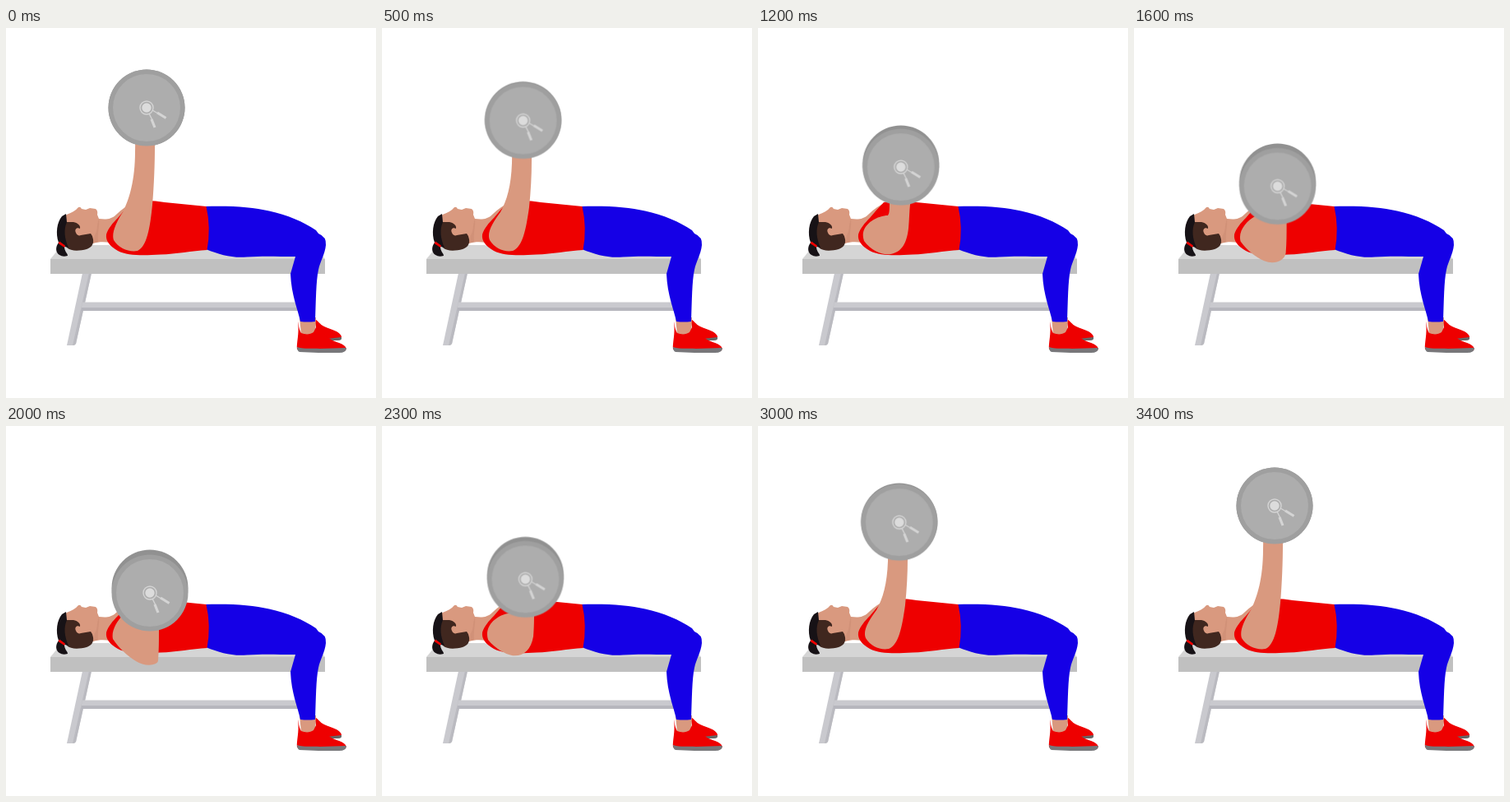
Recreate the animation shown at these times as an HTML page without scripts. Size 450 by 450 pixels, loop 3500 ms.

```html
<!DOCTYPE html>
<html lang="en">
<head>
<meta charset="utf-8">
<title>Bench press</title>
<style>
html, body { margin: 0; width: 100%; height: 100%; overflow: hidden; background: #fff; }
svg { display: block; width: 100vw; height: 100vh; }
.skin { fill: #d9997f; }
.red { fill: #ee0000; }
.blue { fill: #1500e6; }

/* --drop is the full travel; the far plate travels a little less */
.front { --drop: 106px; }
.back { --drop: 100px; }
.plate { animation: press 3.5s -10ms infinite; }
.arm { animation: bend 3.5s -10ms infinite; }

@keyframes press {
  0% { transform: translate(0, 0); animation-timing-function: steps(3); }
  8.5714% { transform: translate(.2px, calc(var(--drop) * .05)); animation-timing-function: steps(3); }
  17.1429% { transform: translate(.8px, calc(var(--drop) * .195)); animation-timing-function: steps(2); }
  22.8571% { transform: translate(1.4px, calc(var(--drop) * .35)); animation-timing-function: steps(4); }
  34.2857% { transform: translate(2.7px, calc(var(--drop) * .68)); animation-timing-function: steps(4); }
  45.7143% { transform: translate(3.6px, calc(var(--drop) * .9)); animation-timing-function: steps(2); }
  51.4286% { transform: translate(3.9px, calc(var(--drop) * .975)); animation-timing-function: steps(2); }
  57.1429% { transform: translate(4px, var(--drop)); animation-timing-function: steps(2); }
  62.8571% { transform: translate(3.7px, calc(var(--drop) * .91)); animation-timing-function: steps(2); }
  68.5714% { transform: translate(3.1px, calc(var(--drop) * .776)); animation-timing-function: steps(2); }
  74.2857% { transform: translate(2.3px, calc(var(--drop) * .58)); animation-timing-function: steps(4); }
  85.7143% { transform: translate(.8px, calc(var(--drop) * .19)); animation-timing-function: steps(2); }
  91.4286% { transform: translate(.2px, calc(var(--drop) * .06)); animation-timing-function: steps(2); }
  97.1429%, 100% { transform: translate(0, 0); }
}

@keyframes bend {
  0%, 97.1429%, 100% { d: path("M158 97L157 150C157 185 150 208 142 224C134 236 128 250 131 258C137 268 150 273 160 271C171 266 175 245 178 215C180 190 181 165 181 143L181 97Z"); }
  17.1429%, 85.7143% { d: path("M159 117L158 165C157 192 152 210 144 224C135 236 127 249 131 258C137 268 149 273 159 271C171 266 175 246 179 218C181 198 182 180 182 162L182 117Z"); }
  22.8571% { d: path("M160 133L159 182C159 205 157 213 152 219C140 228 125 244 130 259C137 268 149 274 159 272C171 267 176 248 180 225C182 210 183 195 183 180L183 133Z"); }
  34.2857% { d: path("M160 167L160 212C160 220 160 226 158 228C145 228 122 240 129 259C138 271 150 276 160 275C175 273 181 261 183 243C184 232 184 223 185 214L185 167Z"); }
  40%, 68.5714% { d: path("M160 178L160 213C160 221 158 227 154 228C143 229 123 241 129 260C138 271 149 277 159 279C172 280 181 272 184 255C185 244 185 231 185 226L185 178Z"); }
  57.1429% { d: path("M160 200L160 220C158 224 148 222 142 230C134 238 128 250 130 259C137 270 148 280 158 286C168 293 184 292 185 286C186 272 186 262 186 250L186 200Z"); }
  74.2857% { d: path("M160 157L160 205C160 215 160 223 157 227C146 227 124 239 130 260C137 270 148 275 159 273C171 269 179 250 182 230C183 220 183 212 183 204L183 157Z"); }
  0%, 40% { animation-timing-function: steps(6); }
  17.1429%, 34.2857%, 68.5714% { animation-timing-function: steps(2); }
  22.8571%, 57.1429%, 74.2857%, 85.7143% { animation-timing-function: steps(4); }
}
</style>
</head>
<body>
<svg viewBox="0 0 450 450">
  <g id="bench">
    <path fill="#c9c9ce" d="M93 298H104L85 384Q84 386 81 386H74Z"/>
    <path fill="#babac0" d="M101 298H104L85 384Q84 386 81 386Z"/>
    <path fill="#c9c9ce" d="M93 333.500H362V344H91Z"/>
    <path fill="#b6b6bd" d="M92 340H362V344H91Z"/>
    <path fill="#d5d5d5" d="M68 264H375L388 281H54Z"/>
    <path fill="#c0c0c0" d="M54 281H388V299H54Z"/>
  </g>

  <g id="head">
    <path class="skin" d="M72 228C77 225 83 224 87 219Q90 216 92 220L97 221L102 219L109 220Q112 222 111 227L113 232C121 233 128 233 134 227Q144 217 156 212L158 262H128L105 262C90 262 75 250 72 228Z"/>
    <path fill="#c98a72" opacity=".5" d="M113 232C110 240 112 246 108 252L106 262L112 260C111 248 114 240 113 232Z"/>
    <path fill="#fff" d="M106 262C112 260 120 260 126 261L132 266Q119 261 104 264Z"/>
    <path fill="#40271f" d="M72 236H82C87 237 91 240 90 244C86 242 83 245 85 249C86 252 89 253 91 252L103 250Q105 252 106 257C107 264 103 267 98 269C90 271 79 272 74 267C68 258 69 245 72 236Z"/>
    <path fill="#171216" d="M73 226L74 236C70 245 71 256 76 267Q69 266 64 261C60 250 62 236 68 229Z"/>
    <path fill="#171216" d="M64 261C60 266 60 273 65 276Q69 279 75 277C75 274 71 272 71 266Z"/>
    <path class="red" d="M65 259.500L72 264.500L71 267L63.500 262Z"/>
  </g>

  <g id="legs">
    <path class="red" d="M375 354C379 355 382 361 387 363C396 367 406 369 408 375V378H380Z"/>
    <path fill="#666" d="M390 378L408 376Q409 380 404 380H393Z"/>
    <path class="skin" d="M357 352H377L376 373H359Z"/>
    <path class="red" d="M355 357C356 360 356 366 359 371C364 373 370 373 374 370L377 364C383 365 386 372 394 378C401 383 412 383 414 390L412 393L354 391C353 383 357 372 355 357Z"/>
    <path fill="#77777a" d="M354 388C364 391 372 389 382 390L414 389Q414 395 405 395L380 395L357 394Q354 393 354 388Z"/>
    <path class="blue" d="M242 217C275 216 300 218 320 222.500C342 227 362 236 377 246L380 250Q390 254 389 264C388 275 382 284 380 294C377 308 377 330 376 357Q367 358 358 357C355 342 347 325 346 299L352 278C330 278 313 277 293 278.500C275 280 261 276 243 269Z"/>
  </g>

  <path class="red" d="M122 251C124 244 130 237 136 231Q145 220 153 212C165 209 180 210 193 212L243.500 217Q249.500 243 244.500 270C226 271 207 275 188 275.500C166 277 148 277 136 271C126 265 121 259 122 251Z"/>
  <path class="plate back" fill="#919191" d="M124.500 97a46.500 46.500 0 0 1 93 0a46.500 46.500 0 0 1 -93 0Z"/>
  <path class="arm skin" d="M158 97L157 150C157 185 150 208 142 224C134 236 128 250 131 258C137 268 150 273 160 271C171 266 175 245 178 215C180 190 181 165 181 143L181 97Z"/>

  <g class="plate front">
    <circle cx="171" cy="97" r="46.500" fill="#9f9f9f"/>
    <circle cx="171" cy="97" r="41" fill="#adadad"/>
    <g fill="none" stroke="#d4d4d4">
      <path stroke-width="1.4" d="M174 104L178 112M178 100L185 104"/>
      <path stroke-width="3.2" d="M177 111L181 121M184 103L194.500 109.500"/>
      <circle cx="171" cy="97" r="8" stroke-width="1.4"/>
    </g>
    <circle cx="171" cy="97" r="5.700" fill="#dcdcdc"/>
  </g>
</svg>
</body>
</html>
```
